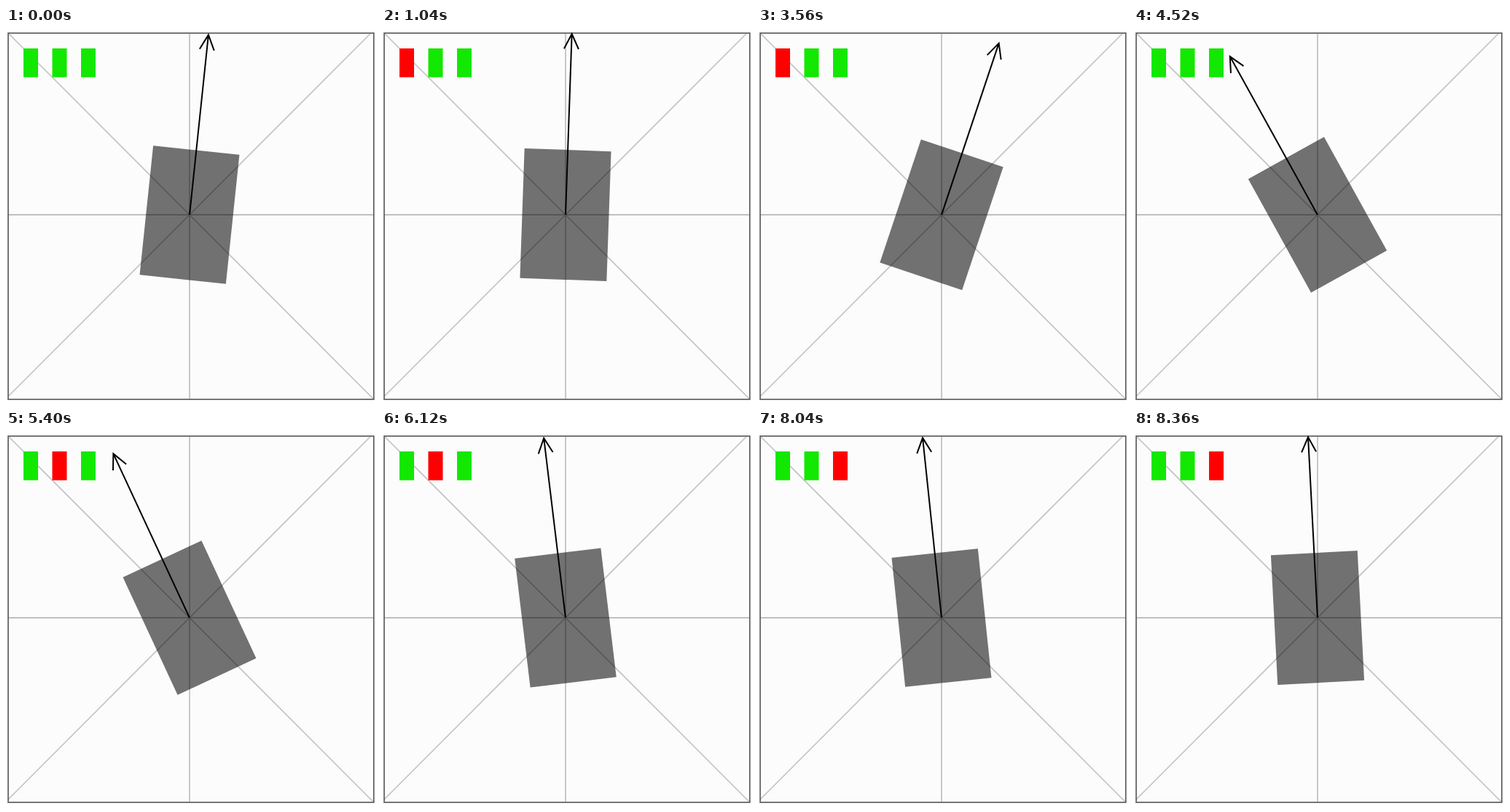
Write an HTML page that moves like this. It is 508 px wide and 514 px high and loops after 8.6 s.

```html
<!DOCTYPE html>
<html lang="en">
<head>
<meta charset="utf-8">
<title>Rotating body with three lights</title>
<style>
  html, body { margin: 0; width: 100%; height: 100%; overflow: hidden; background: #fff; }
  svg { display: block; width: 508px; height: 514px; }
</style>
</head>
<body>
<svg viewBox="0 0 508 514">
  <rect x="3" y="7" width="502" height="502" fill="#fcfcfc"/>
  <g fill="none" stroke="#c3c3c3" stroke-width="1.7">
    <path d="M3 7L505 509M3 505L501 7"/>
    <path d="M252 7V509M3 256H505" stroke="#adadad" stroke-width="1.3"/>
  </g>
  <rect x="3" y="7" width="502" height="502" fill="none" stroke="#686868" stroke-width="1.8"/>
  <g id="lights"></g>
  <g id="body">
    <rect x="-59.5" y="-89" width="119" height="178" fill="#000" fill-opacity=".55"/>
    <path d="M0 0V-248M-10 -227.5L0 -248L10 -227.5" fill="none" stroke="#000" stroke-width="2"/>
  </g>
</svg>
<script>
  const LOOP = 8600, STEP = 40;

  // [time, angle in degrees]; a repeated time is a hard change
  const angles = [
    [0, 6], [320, 2], [1400, 2], [1980, -6.7], [2320, -6], [3120, 18.5],
    [3560, 18.5], [3720, 16], [3720, -29], [4120, -15], [4520, -29],
    [4600, -26], [5360, -26], [5560, -15], [5720, -15], [5880, -26],
    [6120, -6.9], [6600, -3], [7120, 21.6], [7600, 21.6], [7600, -6],
    [8240, -6], [8360, -3], [LOOP, -3]
  ];

  // [time, colours of the three lights]
  const signals = [
    [0, "GGG"], [40, "RGG"], [1440, "RRG"], [2320, "GRG"], [2720, "RGG"],
    [3720, "GGG"], [4120, "RGG"], [4480, "GGG"], [5400, "GRG"],
    [6640, "RRR"], [7600, "GGR"]
  ];
  const colours = { G: "#12e800", R: "#ff0000" };

  const body = document.getElementById("body");
  const lights = [24, 63.5, 103].map(x => {
    const light = document.createElementNS("http://www.w3.org/2000/svg", "rect");
    Object.entries({ x, y: 28, width: 20, height: 39.5 })
      .forEach(([name, value]) => light.setAttribute(name, value));
    return document.getElementById("lights").appendChild(light);
  });

  const lastKey = (keys, t) => keys.findLastIndex(([time]) => time <= t);

  function angleAt(t) {
    const i = lastKey(angles, t);
    const [t0, a0] = angles[i], [t1, a1] = angles[i + 1];
    const ease = (1 - Math.cos(Math.PI * (t - t0) / (t1 - t0))) / 2;
    return a0 + (a1 - a0) * ease;
  }

  function draw(now) {
    const t = Math.floor((now % LOOP) / STEP) * STEP;
    const signal = signals[lastKey(signals, t)][1];
    body.setAttribute("transform", `translate(252 256) rotate(${angleAt(t)})`);
    lights.forEach((light, i) => light.setAttribute("fill", colours[signal[i]]));
  }

  const start = performance.now();
  function tick() {
    draw(performance.now() - start);
    requestAnimationFrame(tick);
  }
  tick();
</script>
</body>
</html>
```
